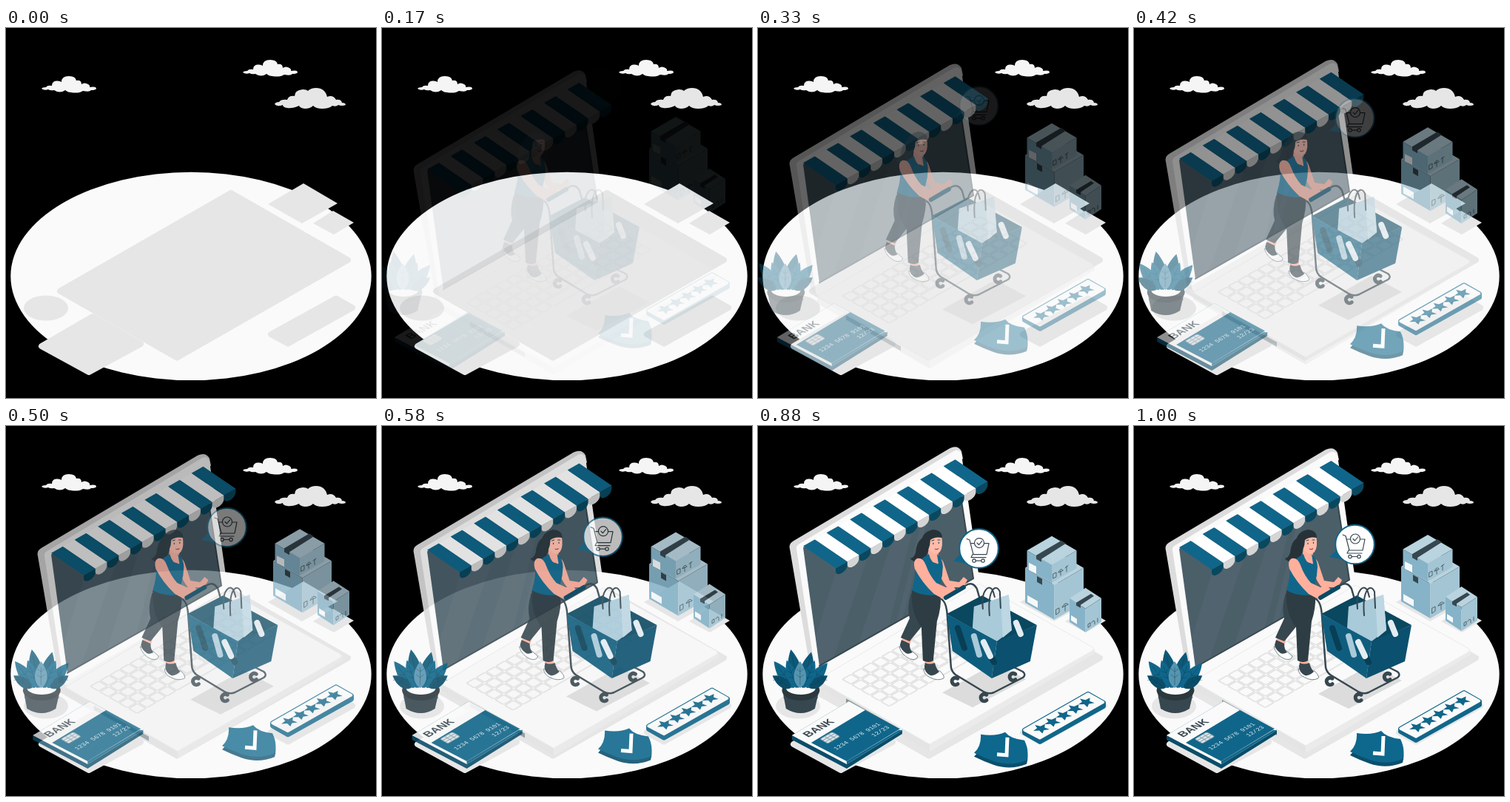
These frames come from a looping animation (500 by 500 pixels, 1.04 s). An HTML page:

```html
<!DOCTYPE html>
<html lang="en">
<head>
<meta charset="utf-8">
<title>Online shopping</title>
<style>
  html, body { margin: 0; height: 100%; overflow: hidden; background: #000; }
  svg { display: block; width: 100vw; height: 100vh; }
  .line { fill: none; stroke: #37474f; stroke-linecap: round; stroke-linejoin: round; }
  .bold { font-family: "Liberation Sans", sans-serif; font-weight: bold; }
  .mono { font-family: "Liberation Mono", monospace; }
</style>
</head>
<body>
<svg viewBox="0 0 500 500">
  <ellipse cx="250" cy="335.400" rx="243.700" ry="140.700" fill="#fafafa"/>

  <g id="shadows" fill="#e6e6e6">
    <g stroke="#e6e6e6" stroke-width="8" stroke-linejoin="round">
      <path d="M304 223L462 313.500L231 445.500L73 355.500Z"/>
      <path d="M48 430L117 390L182 427L112 465Z"/>
      <path d="M358 414L446 365.500L468 378L381 426.500Z"/>
    </g>
    <path d="M354 238L402 210L448 237L400 264ZM415 264L442 247L470 263L443 279Z"/>
    <ellipse cx="54" cy="378.500" rx="30" ry="17"/>
  </g>

  <g id="clouds">
    <path id="cloud" fill="#f5f5f5" d="M48 82Q49 80 54 80Q56 77 62 78Q62 72 68 71.500Q73 71 75 73Q75 65 85 65Q94 65 95 71Q102 70 102 76Q106 73 111 76Q114 78 113 80Q122 78.500 122 82Q121 84 115 84Q113 87 104 85Q100 88 91 87.500Q83 87 80 84Q73 89 65 84Q60 85 57 83Q52 85 48 82Z"/>
    <use href="#cloud" x="272" y="-22"/>
    <path fill="#e6e6e6" d="M363 103Q364 100 369 100Q372 96 380 97Q382 91 390 92Q390 84 401 83Q406 83 408 85Q412 81 419 81Q431 81 434 93Q442 90 446 97Q453 96 454 101Q459 101 459 104Q454 106 449 104Q446 107 441 105Q437 109 427 109Q419 109 415 105Q411 109 404 109Q397 108 396 105Q387 109 380 108Q374 107 374 104Q367 107 363 103Z"/>
  </g>

  <g id="laptop" data-y="30">
    <path fill="#dcdcdc" d="M43 168Q41 161 48 157L259 32Q270 27 275 36L277 46L60 170L84 343L72 338Z"/>
    <path fill="#fafafa" d="M52 168Q51 164 56 161L264 36Q272 32 275 40L299 208Q300 213 296 215L84 343Q79 344 78 338Z"/>
    <path fill="#4b5f69" d="M61 166L267 49L291 208L83 326Z"/>
    <path fill="#61727b" opacity=".25" d="M114 170L161 143L102 315L83 326L78 286ZM190 129L216 114L177 272L136 295ZM226 109L235 104L196 261L187 267Z"/>
    <path class="line" stroke-width="2" d="M83 326L291 208L269 64"/>
    <path fill="#e4e4e4" d="M80 346L232 432V442L80 354Z"/>
    <path fill="#ebebeb" d="M232 432L455 303V309L232 442Z"/>
    <path fill="#fafafa" stroke="#ebebeb" d="M80 345L299 215L451 300Q456 303 451 306L232 432Z"/>
    <path fill="#8d969a" d="M119 370L193 412V418L119 376Z"/>
    <g id="keys" transform="matrix(.866 -.5 .866 .5 114 344)" fill="#fafafa" stroke="#e3e3e3" stroke-width="2"></g>
    <path fill="#dcdcdc" d="M249 362L321 322L362 344L290 382Z"/>
    <g id="awning"></g>
  </g>

  <g id="boxes" data-y="-30">
    <g id="crates"></g>
    <path fill="#37474f" d="M376 173L410 153L416 157L383 178V182L376 178ZM377 201L384 205V213L377 209ZM430 237L450 225L454 228L436 240V244L430 241Z"/>
    <path fill="#f5f8fa" d="M366 183L376 188V198L366 193ZM364 227L378 235V244L364 236ZM423 254L431 259V266L423 261Z"/>
    <path class="line" stroke-width="1" opacity=".75" d="M399 198l4-2v6l-4 2zM406 196q3-7 6-3zM409 194v6M417 195v-7l-2 2m2-2l2-1M403 246l4-2v6l-4 3zM411 243q4-8 8-4zM415 240v8M446 270v-4l3-2v4zM451 264q2-4 4-2v4M459 263v-5"/>
  </g>

  <g id="shopper" data-x="-30">
    <path fill="#ffb09d" d="M193 283l13 4l-3 10l-10-4zM223 312h12l1 11h-12z"/>
    <path fill="#37474f" d="M205 226Q199 246 203 260L191 286L203 291L225 264L236 232Z"/>
    <path fill="#2e3d44" d="M206 222L245 229Q246 246 240 264L235 317Q229 321 221 317L219 272Q204 252 206 222Z"/>
    <path fill="#fff" stroke="#455a64" stroke-width=".7" d="M189 298Q192 310 204 315Q213 317 214 311L206 304ZM222 328Q222 336 231 340Q241 345 249 341Q251 338 244 331Z"/>
    <path fill="#37474f" d="M192 289L203 294Q203 302 207 306Q201 309 198 307Q191 302 190 296ZM224 320Q230 323 237 320Q239 328 243 332Q237 338 231 337Q223 333 223 325Z"/>
    <path fill="#263238" d="M226 148Q214 153 212 165Q211 178 204 179Q207 184 215 183Q226 182 229 164Z"/>
    <path fill="#ffb09d" d="M240 177Q248 179 250 188L257 209L270 211L276 204L281 208Q279 215 271 218L254 218Q247 212 240 190ZM229 163L242 170L241 186L227 182Z"/>
    <path fill="#ffbcaa" d="M227 153L246 148Q249 163 244 170Q240 175 234 171L227 166Z"/>
    <path fill="#263238" d="M219 158Q219 143 235 140Q247 141 247 151Q237 149 231 154Q231 161 228 168Q220 167 219 158Z"/>
    <path class="line" stroke-width="1.200" d="M235 158v1.500M242.500 157v1.500M233 155l3-1M241 154l3 0"/>
    <path fill="none" stroke="#b93f3f" stroke-width="1.200" d="M237 166q3 1.500 5-.5"/>
    <path fill="#10668a" d="M221 178L229 173Q233 188 242 186L240 173Q248 180 248 190L247 202L241 228Q222 231 206 222Q212 203 210 190Z"/>
    <path fill="#ffb09d" d="M213 179Q221 177 225 188Q230 202 239 212L252 218L260 215L265 220Q262 229 255 233L249 234L236 227Q220 212 210 193Q207 182 213 179Z"/>

    <g class="line" stroke="#455a64" stroke-width="2.500">
      <path d="M246 234Q253 238 254 257L259 326Q260 332 265 336L303 359Q310 363 317 360L356 340Q361 336 356 332L342 325M278 216Q288 209 294 220L298 234"/>
    </g>
    <path stroke="#0a4a64" stroke-width="6" stroke-linecap="round" d="M252 232L276 218"/>
    <path fill="#0a4860" d="M253 254L301 229L375 269L321 292Z"/>
    <path fill="#a9cad9" d="M290 244L337 228L341 276L321 291L288 273Z"/>
    <path fill="#bdd7e3" d="M326 232L337 228L341 276L329 286Z"/>
    <path class="line" stroke-width="2" d="M302 247C299 220 312 212 316 224L318 231M311 256C308 220 320 212 325 224L326 246"/>
    <path fill="#0f5d7e" d="M253 254L321 291L314 341L261 304Z"/>
    <path fill="#0b506e" d="M321 291L375 269L366 318L314 341Z"/>
    <g fill="none" stroke-width="8" stroke-linecap="round">
      <path stroke="#083f55" d="M268 273L277 300M312 310L317 319"/>
      <path stroke="#a9cad9" d="M290 284L297 309"/>
      <path stroke="#e3edf2" d="M303 292L312 311M347 266L353 281"/>
    </g>
    <g id="wheels" class="line" stroke-width="5"></g>
  </g>

  <g id="bubble" data-y="-90" data-power="2.5">
    <path fill="#10668a" d="M264 177L273 168L280 180Z"/>
    <circle cx="298.500" cy="160" r="26.300" fill="#fff" stroke="#10668a" stroke-width="2"/>
    <g class="line" stroke-width="1.200">
      <path d="M282 147l4 1.500l5 19.500h18l3-15h-6M287 153h5M290 168l-2 4h20"/>
      <circle cx="299" cy="152.500" r="6.500" fill="#fff"/>
      <path d="M296 152.500l2.500 2.500l4-5M294.500 176.500h7"/>
      <circle cx="292" cy="176.500" r="2.200"/><circle cx="304" cy="176.500" r="2.200"/>
    </g>
  </g>

  <g id="plant" data-x="-30">
    <path fill="#37474f" d="M31 356H81L75 382Q56 394 36 382Z"/>
    <ellipse cx="56" cy="357" rx="25.500" ry="14" fill="#2b383e"/>
    <ellipse cx="56" cy="354" rx="20" ry="9" fill="#fafafa"/>
    <path class="line" stroke="#263238" d="M33 367Q56 381 79 367"/>
    <g id="leaves"></g>
  </g>

  <g id="card" data-x="-30">
    <path fill="#0b4d69" d="M44 418L118 456L193 410V416L118 463L44 424Z"/>
    <path fill="#10668a" d="M44 418L121 372L193 411L118 457Z"/>
    <path fill="#fafafa" d="M44 418L121 372L143 384L70 428L118 453L192 408L193 411L118 457Z"/>
    <path fill="#10668a" d="M118 453L188 411L193 411L118 457Z"/>
    <text class="bold" transform="matrix(.866 -.5 .866 .5 66 421)" font-size="14.500" fill="#37474f">BANK</text>
    <g class="mono" fill="#e1edf2" font-size="8.300">
      <text transform="matrix(.866 -.5 .866 .5 104 438)">1234 5678 9101</text>
      <text transform="matrix(.866 -.5 .866 .5 155 420)">12/23</text>
    </g>
    <g transform="matrix(.866 -.5 .866 .5 82 423)" fill="#dce6eb" stroke="#7f9aa6">
      <rect width="19" height="12" rx="2"/>
      <path d="M0 4H19M0 8H19M7 0V12M13 0V12"/>
    </g>
  </g>

  <g id="rating" data-y="-30">
    <path fill="#10668a" stroke="#10668a" stroke-width="6" stroke-linejoin="round" d="M360 409L446 360L467 372V377L381 425L360 413Z"/>
    <path fill="#fafafa" stroke="#fafafa" stroke-width="3.500" stroke-linejoin="round" d="M360 409L446 360L466.500 371.500L381 420Z"/>
    <g id="stars" fill="#10668a"></g>
  </g>

  <g id="shield" data-y="-30">
    <path id="plate" fill="#0b4f6c" transform="translate(0 5)" d="M301 415Q321 418 334 412Q341 421 360 423Q367 437 363 450Q341 459 318 451Q304 446 292 440Q302 431 301 415Z"/>
    <use href="#plate" y="-5" style="filter:brightness(1.3)"/>
    <path fill="none" stroke="#fff" stroke-width="5" d="M337 419L336 443L323 442"/>
  </g>
</svg>

<script>
const $ = id => document.getElementById(id);
const add = (id, html) => $(id).insertAdjacentHTML('beforeend', html);

// Keyboard, with a space bar in the front row
for (let row = 0; row < 5; row++)
  for (let col = 0; col < 14; col++) {
    const bar = row === 4 && col === 4;
    add('keys', `<rect x="${col * 15.5}" y="${row * 15}" width="${bar ? 75 : 13.5}" height="13" rx="2"/>`);
    if (bar) col += 4;
  }

// Awning: sloping stripes, each ending in a scallop
for (let i = 0; i < 13; i++) {
  const x = 61 + i * 15.8, y = 164 - i * 9, teal = i % 2 === 0;
  add('awning', `<path fill="${teal ? '#09485f' : '#d5d5d5'}" d="M${x + 44} ${y + 30}l15.8 -9v4c0 10 -15.800 18 -15.800 9z"/>
    <path fill="${teal ? '#10668a' : '#fff'}" d="M${x} ${y}l15.900 -9l44 30l-15.900 9z"/>`);
}

// Box seen from its front corner: centre x, front top y, half width, depth, height
function crate(x, y, w, d, h) {
  add('crates', `<path fill="#b9d3df" d="M${x} ${y}l${-w} ${-d}l${w} ${-d}l${w} ${d}z"/>
    <path fill="#86b3c8" d="M${x} ${y}l${-w} ${-d}v${h}l${w} ${d}z"/>
    <path fill="#a3c5d4" d="M${x} ${y}l${w} ${-d}v${h}l${-w} ${d}z"/>`);
}
crate(400.5, 213, 39.5, 23, 47);
crate(397, 186, 33.5, 19.5, 24);
crate(442.5, 245, 21.5, 14, 32);

for (const [x, y] of [[265, 345], [304, 367], [343, 339]])
  add('wheels', `<circle cx="${x}" cy="${y}" r="4.800" stroke-dasharray="21 10" transform="rotate(50 ${x} ${y})"/>`);

// Leaves: angle, length, half width, colour
for (const [angle, length, width, fill] of [
  [-11, 53, 11, '#0d5877'], [14, 50, 11, '#0d5877'], [-37, 45, 10, '#10668a'], [40, 44, 10, '#10668a'],
  [-56, 30, 8, '#0b4d69'], [56, 30, 8, '#0b4d69'], [-20, 40, 9, '#10668a'], [22, 40, 9, '#10668a'], [0, 36, 10, '#5794b0']
])
  add('leaves', `<g transform="translate(${55 + angle * .22} 354) rotate(${angle})">
    <path fill="${fill}" d="M0 0C${-width * 1.2} ${-length * .2} ${-width} ${-length * .65} 0 ${-length}C${width} ${-length * .65} ${width * 1.2} ${-length * .2} 0 0"/>
    <path fill="none" stroke="#083f55" stroke-width=".7" opacity=".6" d="M0 -4V${8 - length}M-5 -18L0 -14L5 -18M-5 -26L0 -22L5 -26"/></g>`);

const star = Array.from({ length: 10 }, (_, i) => {
  const r = i % 2 ? 4.4 : 9.5, a = i * Math.PI / 5;
  return [r * Math.sin(a), -r * Math.cos(a)].map(n => n.toFixed(2));
}).join(' ');
for (let i = 0; i < 5; i++)
  add('stars', `<polygon points="${star}" transform="matrix(.866 -.5 .866 .5 ${382.5 + i * 15.2} ${407 - i * 8.9})"/>`);

// cubic-bezier(.36, -.01, .5, 1.38)
const curve = (s, a, b) => 3 * (1 - s) ** 2 * s * a + 3 * (1 - s) * s * s * b + s ** 3;
function ease(x) {
  let low = 0, high = 1;
  for (let i = 0; i < 24; i++) {
    const mid = (low + high) / 2;
    if (curve(mid, .36, .5) < x) low = mid; else high = mid;
  }
  return curve(low, -.01, 1.38);
}

const LOOP = 1040, FPS = 24;
const movers = document.querySelectorAll('[data-x], [data-y]');
const start = performance.now();

function draw() {
  const time = (performance.now() - start) % LOOP;
  const step = Math.floor(time * FPS / 1000 + .1);
  const p = ease(Math.min(step / FPS, 1));
  for (const el of movers) {
    const { x = 0, y = 0, power = 1 } = el.dataset;
    el.setAttribute('transform', `translate(${x * (1 - p)} ${y * (1 - p)})`);
    el.setAttribute('opacity', Math.min(Math.max(p, 0) ** power, 1));
  }
  requestAnimationFrame(draw);
}
draw();
</script>
</body>
</html>
```
